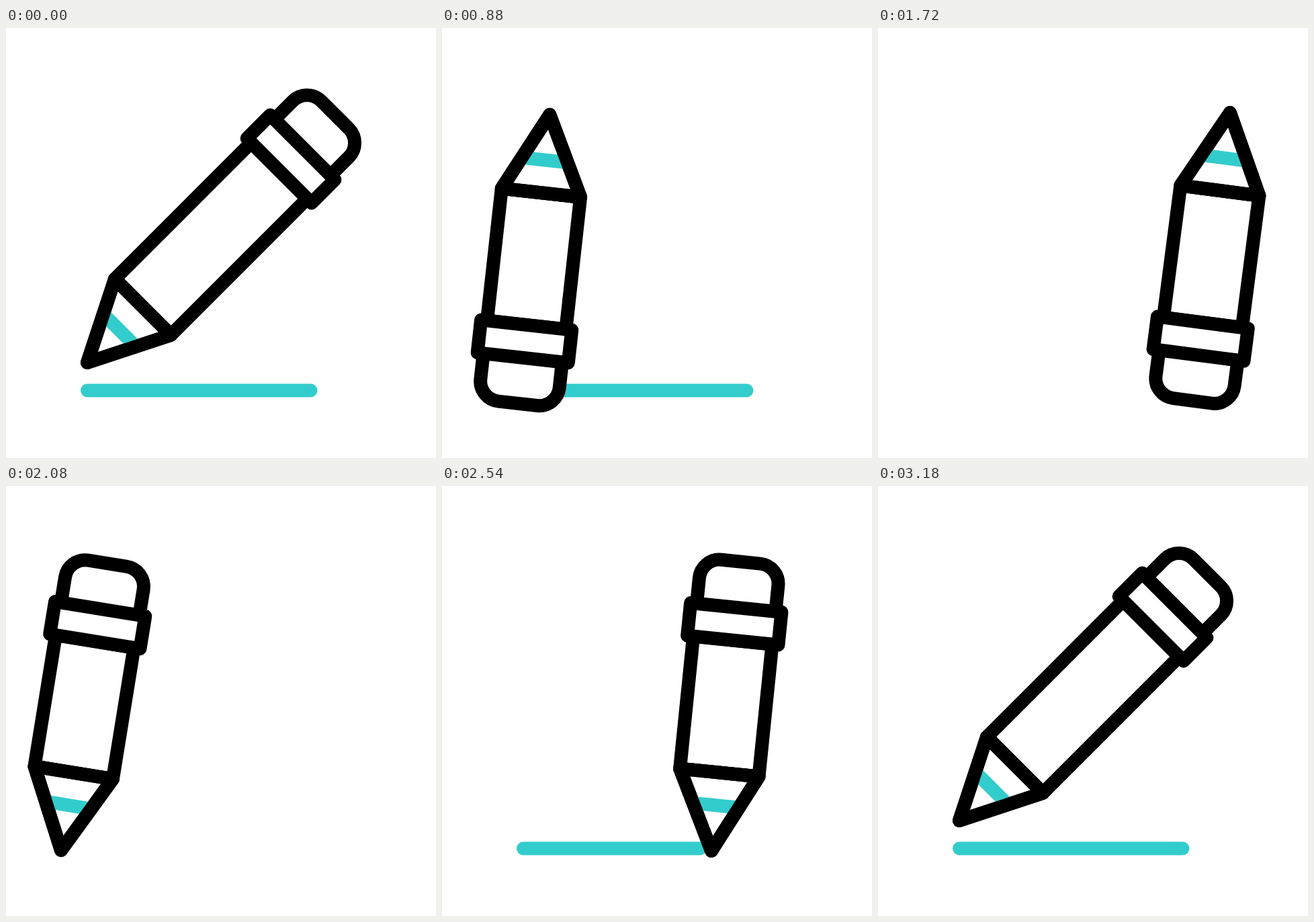
These frames come from a looping animation (640x640 px, 3.6 s). An HTML page:

```html
<!DOCTYPE html>
<html lang="en">
<head>
<meta charset="utf-8">
<title>Pencil</title>
<style>
  html, body { margin: 0; width: 100%; height: 100%; overflow: hidden; background: #fff; }
  svg { display: block; width: 100vw; height: 100vh; }
  .ink { fill: #fff; stroke: #000; stroke-width: 20; stroke-linecap: round; stroke-linejoin: round; }
  .accent { fill: none; stroke: #3cc; stroke-width: 20; }
  #line { stroke-linecap: round; }
</style>
</head>
<body>
<svg viewBox="0 0 640 640">
  <path id="line" class="accent" d="M121 539.5H453.5"/>
  <g id="pencil">
    <path id="body" class="ink"/>
    <g id="point">
      <path class="ink" d="M-59 99L0 216L59 99Z"/>
      <path class="accent" d="M-34 148H34"/>
      <path class="ink" style="fill:none" d="M-59 99L0 216L59 99Z"/>
    </g>
    <g id="top">
      <path class="ink" d="M-59 -148V-186.500a30 30 0 0 1 30 -30H29a30 30 0 0 1 30 30V-148"/>
      <path class="ink" d="M-68 -99V-148H68V-99Z"/>
    </g>
  </g>
</svg>
<script>
const LOOP = 3600, STEP = 20, STRETCH = 44.5;
const LEFT = 121, RIGHT = 453.5;
const el = id => document.getElementById(id);

// Smooth curve through [time, value] keys that never overshoots them.
function track(...keys) {
  const slope = keys.slice(1).map((k, i) => (k[1] - keys[i][1]) / (k[0] - keys[i][0]));
  const tangent = keys.map((_, i) => {
    const a = slope[i - 1] || 0, b = slope[i] || 0;
    return a * b > 0 ? 2 * a * b / (a + b) : 0;
  });
  return t => {
    if (t <= keys[0][0]) return keys[0][1];
    const i = keys.findIndex(k => k[0] >= t) - 1;
    if (i < 0) return keys[keys.length - 1][1];
    const [t0, v0] = keys[i], [t1, v1] = keys[i + 1];
    const d = t1 - t0, p = (t - t0) / d, q = 1 - p;
    return v0 * q * q * (1 + 2 * p) + v1 * p * p * (3 - 2 * p)
         + d * p * q * (tangent[i] * q - tangent[i + 1] * p);
  };
}

const posX = track([180, 305.2], [360, 297], [540, 249.7], [700, 111], [800, 112],
  [1200, 433.4], [1240, 463], [1360, 514], [1700, 514], [1720, 496.1], [1990, 190],
  [2080, 116.5], [2130, 119], [2240, 153], [2540, 422.8], [2640, 490], [2780, 455],
  [2960, 380], [3180, 305.2]);
const posY = track([180, 313.8], [540, 309.2], [700, 295], [740, 295], [830, 343],
  [1110, 345], [1200, 340.1], [1360, 343], [1700, 343], [1720, 340.2], [2080, 329],
  [2540, 328.1], [2640, 328], [2780, 319], [2960, 289], [3180, 313.8]);
const turn = track([180, 45], [360, 57], [540, 115.2], [700, 180], [800, 180],
  [1100, 216], [1200, 206.6], [1240, 198.5], [1360, 180], [1700, 180], [1720, 187.4],
  [2080, 369.2], [2130, 382], [2240, 371], [2540, 365.8], [2640, 364], [2780, 370],
  [2960, 385], [3180, 405]);
const stretch = track([180, 1], [380, 0], [2780, 0], [2970, 0.87], [3180, 1]);

function drawLine(t, x, angle) {
  const sin = Math.sin(angle * Math.PI / 180);
  let from = LEFT, to = RIGHT;
  if (t > 760 && t < 1360) from = Math.max(LEFT, x + 217 * sin + 20);
  else if (t >= 2200 && t < 2640) to = Math.min(RIGHT, x - 216 * sin - 17);
  const shown = from <= to && !(t >= 1360 && t < 2200);
  el('line').style.display = shown ? '' : 'none';
  if (shown) el('line').setAttribute('d', `M${from} 539.5H${to}`);
}

function draw(t) {
  const x = posX(t), angle = turn(t), s = STRETCH * stretch(t);
  el('pencil').setAttribute('transform', `translate(${x} ${posY(t)}) rotate(${angle})`);
  el('point').setAttribute('transform', `translate(0 ${s})`);
  el('top').setAttribute('transform', `translate(0 ${-s})`);
  el('body').setAttribute('d', `M-59 ${99 + s}V${-99 - s}H59V${99 + s}Z`);
  drawLine(t, x, angle);
}

const start = performance.now();
function frame() {
  const t = (performance.now() - start) % LOOP;
  draw(t - t % STEP);
  requestAnimationFrame(frame);
}
frame();
</script>
</body>
</html>
```
